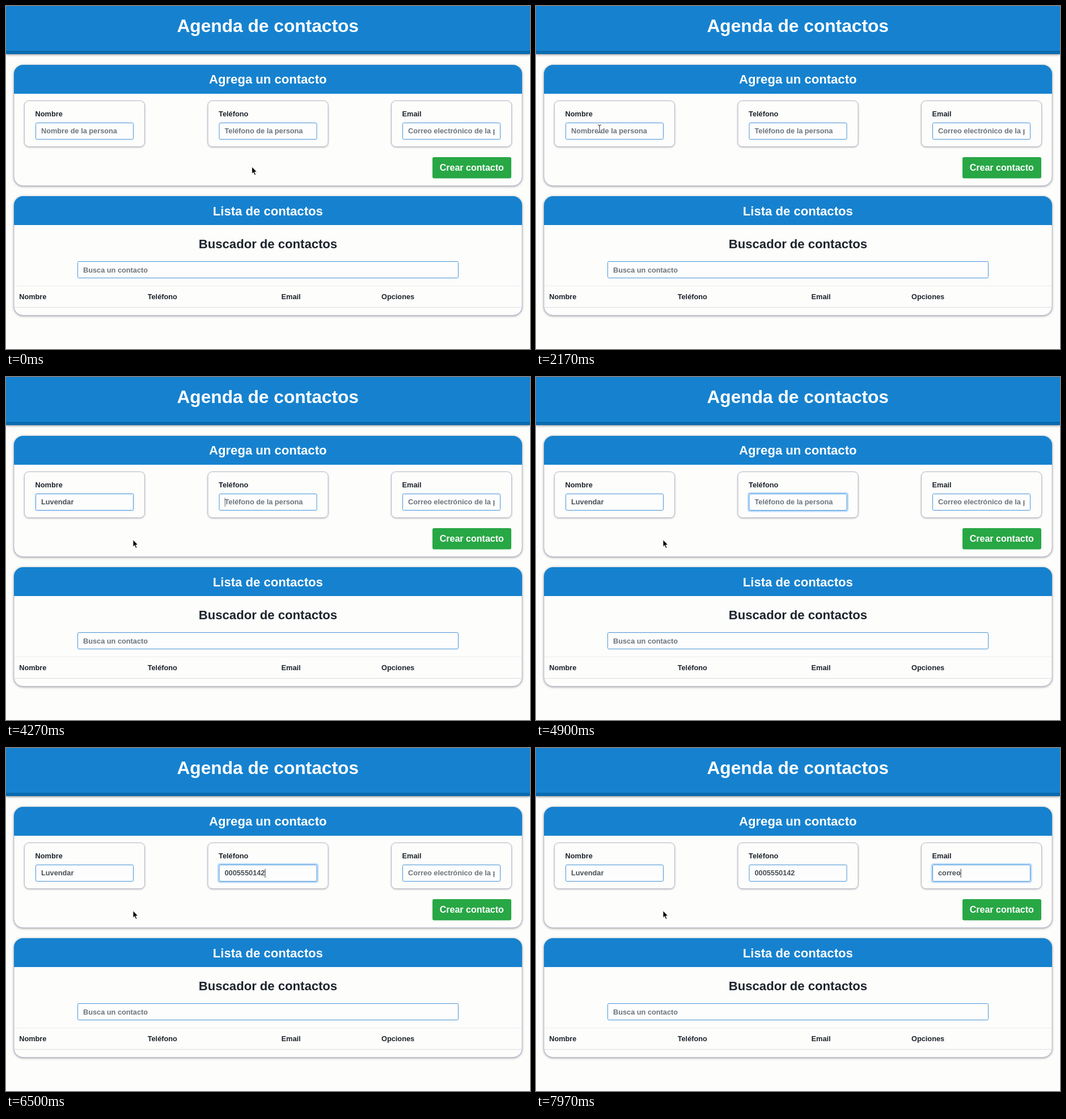
An HTML page that plays this animation: 924 by 606 pixels, repeating every 8000 ms.

```html
<!DOCTYPE html>
<html lang="es">
<head>
<meta charset="utf-8">
<title>Agenda de contactos</title>
<style>
  html, body { margin: 0; width: 100%; height: 100%; overflow: hidden; background: #fdfdfc; }
  svg { display: block; }
  text { font: bold 12.75px "Liberation Sans", Arial, sans-serif; fill: #1c232b; white-space: pre; }
  .title { font-size: 31.7px; fill: #fff; text-anchor: middle; }
  .heading { font-size: 22.1px; text-anchor: middle; }
  .light { fill: #fff; }
  .button { font-size: 16.05px; fill: #fff; text-anchor: middle; }
  .placeholder { fill: #6c757d; }
  .value { fill: #495057; }
  .blue { fill: #1682cf; }
  .white { fill: #fdfdfc; }
  .box { fill: #fdfdfc; stroke: #b9b8cc; }
  .input { fill: #fdfdfd; stroke: #4795d7; }
  .ring { fill: none; stroke: #007bff; stroke-opacity: .27; stroke-width: 2.6; }
  .shadow { filter: drop-shadow(0 1px 2px rgba(0, 0, 0, .45)); }
  .soft { filter: drop-shadow(0 1px 1.5px rgba(0, 0, 0, .25)); }
</style>
</head>
<body>
<svg width="924" height="606" viewBox="0 0 924 606">
  <g class="shadow">
    <path class="blue" d="M0 0H924V79H0z"/>
    <path fill="#0b6bb0" d="M0 79H924V85H0z"/>
  </g>
  <text class="title" x="461.7" y="46.4">Agenda de contactos</text>
  <g id="cards"></g>
  <text class="heading light" x="461.8" y="137">Agrega un contacto</text>
  <text class="heading light" x="461.8" y="369.5">Lista de contactos</text>
  <text class="heading" x="462" y="428">Buscador de contactos</text>
  <rect class="input" x="126.5" y="451.5" width="671" height="29" rx="2"/>
  <text class="placeholder" x="136" y="471">Busca un contacto</text>
  <path d="M14 494.5H910" stroke="#ececee"/>
  <path d="M14 532.5H910" stroke="#d9dcdf"/>
  <g id="columns"></g>
  <rect x="752" y="267" width="139" height="37.5" rx="3" fill="#28a745"/>
  <text class="button" x="821.3" y="291.2">Crear contacto</text>
  <g id="fields"></g>
  <path id="arrow" d="M0 0V12.6L2.8 10 4.9 14.9 7 14 4.9 9.2H8.9z" fill="#000" stroke="#fff" stroke-width=".9"/>
  <path id="beam" d="M-3-7Q0-7 0-5Q0-7 3-7M0-5V5M-3 7Q0 7 0 5Q0 7 3 7" fill="none" stroke="#222"/>
</svg>
<script>
const LOOP = 8000, BLINK = 500, FADE = 150;
const $ = id => document.getElementById(id);
const clamp = v => Math.min(1, Math.max(0, v));
const ease = v => v * v * (3 - 2 * v);

// Focus interval, then the first keystroke and the time between keystrokes
const fields = [
  { x: 32, label: 'Nombre', hint: 'Nombre de la persona', value: 'Luvendar',
    focus: 2400, blur: 4170, start: 3230, step: 110 },
  { x: 355.5, label: 'Teléfono', hint: 'Teléfono de la persona', value: '0005550142',
    focus: 4255, blur: 6900, start: 4920, step: 138 },
  { x: 679, label: 'Email', hint: 'Correo electrónico de la persona', value: 'correo',
    focus: 6910, blur: LOOP, start: 7270, step: 130 }
];

// Pointer moves: start time, end time, end position
const home = [433.6, 284];
const moves = [[1345, 2050, 112, 217], [2450, 2950, 224, 287.5]];

const card = (top, bottom) => `
  <rect class="blue shadow" x="14" y="${top}" width="896" height="${bottom - top}" rx="16"/>
  <path class="white" stroke="#b9b8cc" stroke-width=".8"
    d="M14 ${top + 51}V${bottom - 16}a16 16 0 0 0 16 16H894a16 16 0 0 0 16-16V${top + 51}"/>`;
$('cards').innerHTML = card(104, 317.5) + card(336, 546.5);

$('columns').innerHTML = [[23.2, 'Nombre'], [249.7, 'Teléfono'], [485.6, 'Email'], [662, 'Opciones']]
  .map(([x, name]) => `<text x="${x}" y="518">${name}</text>`).join('');

$('fields').innerHTML = fields.map(({ x, label }) => `
  <g transform="translate(${x} 167)">
    <rect class="box soft" x=".5" y=".5" width="212" height="81" rx="8"/>
    <text x="19.6" y="27.5">${label}</text>
    <rect class="ring" x="18.7" y="37.7" width="175.6" height="32.6" rx="3.5"/>
    <rect class="input" x="20.5" y="39.5" width="172" height="29" rx="2"/>
    <svg x="30" y="40" width="153" height="28">
      <text class="content" y="18.2"></text>
      <path class="caret" d="M.5 6.5V22" stroke="#333"/>
    </svg>
  </g>`).join('');

fields.forEach((field, i) => {
  const root = $('fields').children[i];
  for (const part of ['ring', 'content', 'caret']) field[part] = root.querySelector('.' + part);
});

function drawField(f, t) {
  const typed = t < f.start ? 0 : Math.floor((t - f.start) / f.step) + 1;
  f.content.textContent = typed ? f.value.slice(0, typed) : f.hint;
  f.content.setAttribute('class', typed ? 'value' : 'placeholder');
  f.ring.style.opacity = ease(clamp((t - f.focus) / FADE)) * (1 - ease(clamp((t - f.blur) / FADE)));
  const on = t >= f.focus && t < f.blur && Math.floor((t - f.focus) / BLINK) % 2 === 0;
  f.caret.style.display = on ? '' : 'none';
  f.caret.setAttribute('transform', `translate(${typed ? f.content.getComputedTextLength() : 0})`);
}

function drawPointer(t) {
  let [x, y] = home;
  for (const [from, to, endX, endY] of moves) {
    const p = ease(clamp((t - from) / (to - from)));
    x += (endX - x) * p;
    y += (endY - y) * p;
  }
  const overInput = x > 52 && x < 225 && y > 206 && y < 236;
  $('arrow').style.display = overInput ? 'none' : '';
  $('beam').style.display = overInput ? '' : 'none';
  for (const id of ['arrow', 'beam']) $(id).setAttribute('transform', `translate(${x} ${y})`);
}

function draw() {
  const t = performance.now() % LOOP;
  fields.forEach(f => drawField(f, t));
  drawPointer(t);
  requestAnimationFrame(draw);
}
draw();
</script>
</body>
</html>
```
